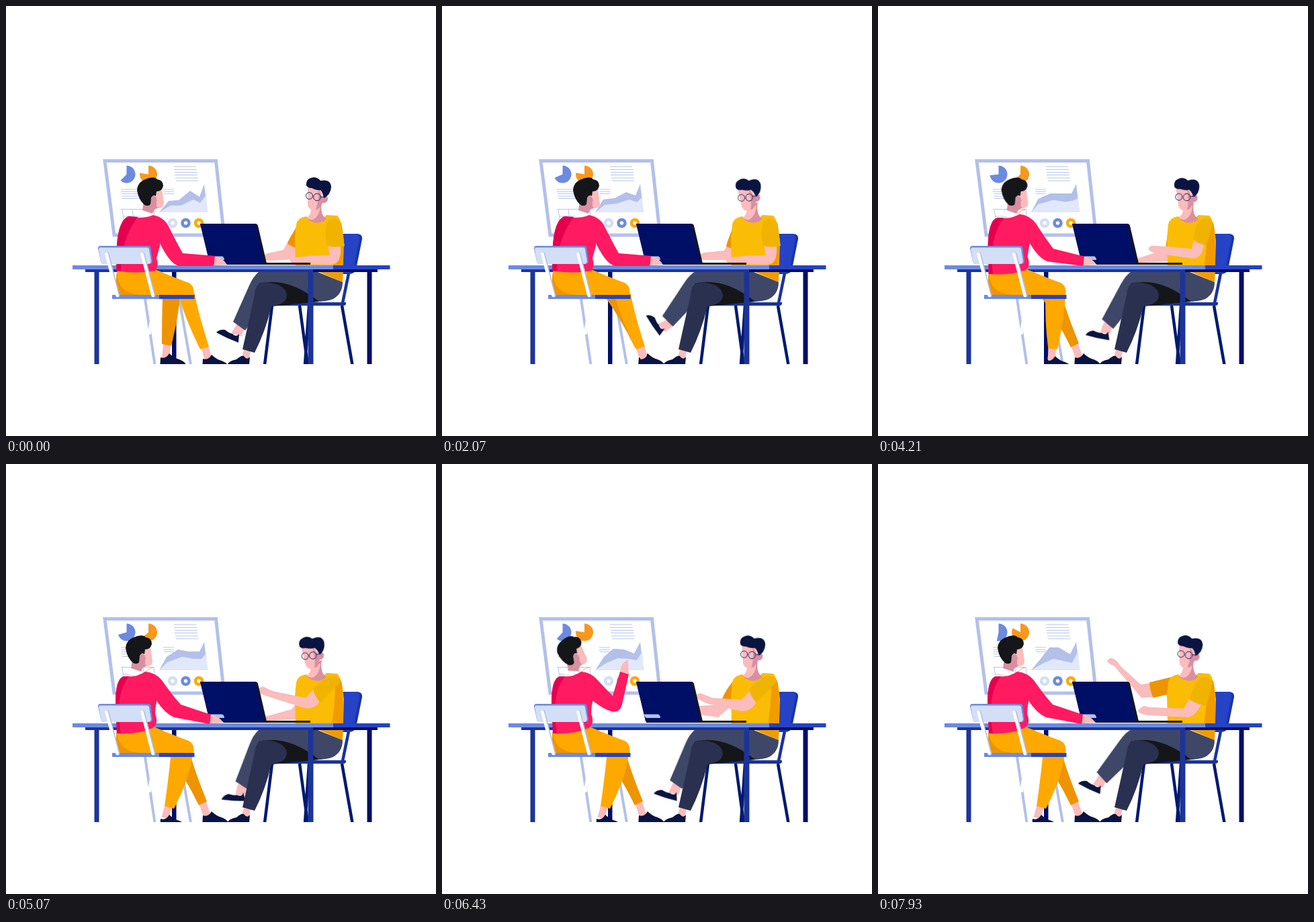
Recreate the animation shown at these times as an HTML page without scripts. Size 640 px wide and 640 px high, loop 8000 ms.

```html
<!DOCTYPE html>
<html lang="en">
<head>
<meta charset="utf-8">
<title>Office meeting</title>
<style>
html, body { margin: 0; width: 100%; height: 100%; overflow: hidden; background: #fff; }
svg { display: block; width: 100%; height: 100%; }
.a { animation: 8s ease-in-out infinite; }

/* board */
.pie { fill: none; stroke-width: 13; animation-timing-function: linear; }
.pie1 { animation-name: pie1; }
.pie2 { animation-name: pie2; }
@keyframes pie1 {
  0% { stroke-dasharray: 224 360; } 16.1% { stroke-dasharray: 235 360; } 25.9% { stroke-dasharray: 245 360; }
  43.8% { stroke-dasharray: 270 360; } 63.4% { stroke-dasharray: 253 360; } 80.4% { stroke-dasharray: 222 360; }
  99.1%, 100% { stroke-dasharray: 193 360; }
}
@keyframes pie2 {
  0% { stroke-dasharray: 279 360; } 16.1% { stroke-dasharray: 270 360; } 25.9% { stroke-dasharray: 281 360; }
  43.8% { stroke-dasharray: 228 360; } 63.4% { stroke-dasharray: 230 360; } 80.4% { stroke-dasharray: 280 360; }
  99.1%, 100% { stroke-dasharray: 300 360; }
}
.area1 { animation-name: area1; }
.area2 { animation-name: area2; }
@keyframes area1 {
  0% { d: path("M228 307L242 290L257 289L274 275L288 284L295 265L300 307Z"); }
  16.1%, 25.9% { d: path("M228 307L240 288L257 286L274 277L288 282L295 265L300 307Z"); }
  43.8% { d: path("M228 307L238 287L257 281L275 279L288 279L295 265L300 307Z"); }
  63.4% { d: path("M228 307L239 287L256 276L272 279L288 279L295 265L300 307Z"); }
  80.4% { d: path("M228 307L241 287L255 275L271 276L286 282L295 265L300 307Z"); }
  99.1%, 100% { d: path("M228 307L242 290L255 273L269 273L286 283L295 265L300 307Z"); }
}
@keyframes area2 {
  0% { d: path("M228 307L245 297L260 297L279 288L289 293L298 281L300 307Z"); }
  16.1%, 25.9% { d: path("M228 307L242 296L260 294L279 288L290 292L298 285L300 307Z"); }
  43.8% { d: path("M228 307L237 295L261 290L279 293L291 289L298 289L300 307Z"); }
  63.4% { d: path("M228 307L240 295L262 287L279 290L291 290L298 282L300 307Z"); }
  80.4% { d: path("M228 307L243 297L262 289L277 290L290 292L298 279L300 307Z"); }
  99.1%, 100% { d: path("M228 307L245 297L261 290L271 292L289 296L298 278L300 307Z"); }
}

/* left person */
.lean { animation-name: lean; }
.nod { animation-name: nod; transform-origin: 217px 300px; }
.torso { animation-name: torso; }
.shade { animation-name: shade; }
.arm { animation-name: arm; }
.hand { animation-name: hand; }
@keyframes lean { 0%, 46% { transform: none; } 57%, 100% { transform: translateX(-17px); } }
@keyframes nod { 0%, 66% { transform: none; } 76%, 84% { transform: rotate(-16deg); } 94%, 100% { transform: none; } }
@keyframes torso {
  0%, 46% { d: path("M182 313Q168 318 165 355L164 394Q195 399 222 394Q228 388 224 375Q230 355 231 345Q245 320 218 311Q205 318 182 313Z"); }
  57%, 100% { d: path("M176 316Q163 318 163 355L165 401Q195 403 218 393Q228 386 222 372Q222 360 226 345Q235 322 207 309Q195 318 176 316Z"); }
}
@keyframes shade {
  0%, 46% { d: path("M183 313Q168 318 165 355L164 394L171 395Q170 350 196 314Z"); }
  57%, 100% { d: path("M176 316Q163 318 163 355L165 401L171 401Q161 345 183 316Z"); }
}
@keyframes arm {
  0%, 46% { d: path("M218 311Q236 314 243 330Q254 352 263 368L311 372L309 387L258 387Q245 385 230 355Z"); }
  57%, 66%, 94%, 100% { d: path("M207 309Q222 310 232 322Q246 342 260 358L305 373L303 387L250 377Q236 371 224 352Z"); }
  76%, 84% { d: path("M207 309Q222 310 232 322Q243 334 254 345L265 309L278 313L268 358Q262 382 224 352Z"); }
}
@keyframes hand {
  0%, 46% { d: path("M311 373Q321 373 329 385L309 386Z"); }
  57%, 66%, 94%, 100% { d: path("M305 373Q315 374 324 385L303 386Z"); }
  76%, 84% { d: path("M265 309Q266 296 277 291L278 313Z"); }
}
.ankle { fill: none; stroke: #fabcbc; stroke-width: 11; }
.far .shin { animation-name: farShin; }
.far .ankle { animation-name: farAnkle; }
.far .shoe { animation-name: farShoe; }
.near .shin { animation-name: nearShin; }
.near .ankle { animation-name: nearAnkle; }
.near .shoe { animation-name: nearShoe; }
@keyframes farShin {
  0%, 17% { d: path("M233 432L259 432Q257 460 246 506L232 503Q232 470 233 432Z"); }
  25%, 100% { d: path("M242 432L274 432Q282 460 299 502L287 508Q266 465 242 432Z"); }
}
@keyframes farAnkle { 0%, 17% { d: path("M240 502L237 526"); } 25%, 100% { d: path("M292 502L300 526"); } }
@keyframes farShoe { 0%, 17% { transform: none; } 25%, 100% { transform: translateX(63px); } }
@keyframes nearShin {
  0%, 46% { d: path("M257 428L281 428Q284 450 302 507L289 511Q262 455 257 428Z"); }
  57%, 100% { d: path("M246 428L278 428Q276 462 250 513L236 509Q241 475 246 428Z"); }
}
@keyframes nearAnkle { 0%, 46% { d: path("M296 507L301 526"); } 57%, 100% { d: path("M242 508L237 527"); } }
@keyframes nearShoe { 0%, 46% { transform: translate(63px, 2px); } 57%, 100% { transform: translate(0, 5px); } }

/* right person */
.head { animation-name: head; transform-origin: 462px 310px; }
@keyframes head {
  0% { transform: none; } 16.1%, 25.9% { transform: rotate(-13deg); } 43.8% { transform: rotate(-3.5deg); }
  63.4% { transform: rotate(-14deg); } 80.4% { transform: rotate(-4deg); } 99.1%, 100% { transform: rotate(-1deg); }
}
.swing { animation-name: swing; transform-origin: 385px 405px; }
.foot { animation-name: foot; transform-origin: 346px 482px; }
@keyframes swing {
  0% { transform: none; } 16.1%, 43.8% { transform: rotate(9.5deg); } 63.4% { transform: rotate(-3deg); }
  80.4% { transform: rotate(-1deg); } 99.1%, 100% { transform: rotate(12deg); }
}
@keyframes foot {
  0% { transform: none; } 16.1% { transform: rotate(-6.5deg); } 25.9% { transform: rotate(22deg); }
  43.8% { transform: rotate(-15.5deg); } 63.4% { transform: rotate(-18deg); } 80.4% { transform: rotate(-6deg); }
  99.1%, 100% { transform: rotate(-11deg); }
}
.backSleeve { animation-name: backSleeve; }
.backArm { animation-name: backArm; }
.sleeve { animation-name: sleeve; }
.frontArm { animation-name: frontArm; }
@keyframes backSleeve {
  0% { d: path("M434 326L434 362L419 354Q420 349 425 341Z"); }
  16.1% { d: path("M439 317L433 346L417 353Q408 347 407 334Z"); }
  25.9% { d: path("M434 326L434 362L423 358Q424 352 427 345Z"); }
  43.8% { d: path("M434 326L434 362L427 358Q427 352 429 345Z"); }
  63.4% { d: path("M436 326L436 362L431 358Q431 352 432 345Z"); }
  80.4% { d: path("M434 322L434 355L417 349Q420 342 425 334Z"); }
  99.1%, 100% { d: path("M441 316L431 343L410 348Q405 340 404 325Z"); }
}
@keyframes backArm {
  0% { d: path("M390 368L413 363L421 348L434 358L432 377L390 379Q384 378 382 374Q384 370 390 368Z"); }
  16.1% { d: path("M357 322L397 339L408 333L417 352L397 358L345 326Q334 323 334 318Q342 309 357 322Z"); }
  25.9% { d: path("M390 367L420 364L427 352L434 358L432 378L390 378Q384 378 382 374Q384 369 390 367Z"); }
  43.8% { d: path("M390 374L422 363L428 356L434 358L432 380L390 382Q384 381 382 378Q384 376 390 374Z"); }
  63.4% { d: path("M390 375L425 365L431 358L434 358L432 380L390 382Q384 381 382 378Q384 376 390 375Z"); }
  80.4% { d: path("M384 360L415 358L424 348L434 357L411 377L384 373Q376 370 374 366Q376 361 384 360Z"); }
  99.1%, 100% { d: path("M362 302L391 328L406 326L410 347L392 348L352 301Q342 297 341 293Q349 282 362 302Z"); }
}
@keyframes sleeve {
  0%, 25.9%, 43.8% { d: path("M478 320Q488 312 498 322L504 357Q490 360 478 357Q473 338 478 320Z"); }
  16.1% { d: path("M478 320Q488 312 498 322L511 351Q500 358 487 357Q474 345 478 320Z"); }
  63.4%, 80.4% { d: path("M480 317Q492 312 499 323L468 355Q460 348 457 335Q466 325 480 317Z"); }
  99.1%, 100% { d: path("M478 320Q490 312 498 325L489 360Q475 358 463 350Q470 330 478 320Z"); }
}
@keyframes frontArm {
  0%, 25.9%, 43.8% { d: path("M425 375L450 372L482 371L479 355L498 355Q500 385 484 385L430 384Q418 380 425 375Z"); }
  16.1% { d: path("M436 363L450 367L493 368L486 355L509 351Q520 383 503 383L440 376Q424 370 436 363Z"); }
  63.4% { d: path("M382 331L397 338L446 348L458 335L467 353Q458 368 440 362L390 346Q364 338 382 331Z"); }
  80.4% { d: path("M385 341L402 348L446 351L458 338L469 352Q462 368 446 368L396 357Q366 345 385 341Z"); }
  99.1%, 100% { d: path("M396 360L405 362L455 364L465 347L482 357Q470 378 460 377L402 374Q376 370 396 360Z"); }
}
</style>
</head>
<body>
<svg viewBox="0 0 640 640">
  <defs>
    <clipPath id="floor"><path d="M0 0H640V533H0Z"/></clipPath>
    <path id="shoe" d="M229 540L230 523Q238 526 243 517Q250 524 258 526Q266 529 268 534V540Z" fill="#0a1440"/>
  </defs>
  <g clip-path="url(#floor)">

    <!-- board -->
    <path d="M147 230.500H312.500L324.500 341H161Z" fill="#fff" stroke="#b3c0ea" stroke-width="5"/>
    <circle class="a pie pie1" cx="179.500" cy="250.500" r="6.500" pathLength="360" stroke="#6c8ae0" stroke-dasharray="224 360" transform="rotate(-90 179.500 250.500)"/>
    <circle class="a pie pie2" cx="212" cy="250.500" r="6.500" pathLength="360" stroke="#f8981d" stroke-dasharray="279 360" transform="rotate(-90 212 250.500)"/>
    <g fill="none" stroke="#b9c5ea">
      <path d="M250 239H283M250 243.500H284M251 247.500H285M251 251.500H285M252 256H286M253 260H286"/>
      <path d="M171 273H196M171 276.500H196M172 279.500H197M172 283H197M173 286.500H198M234 273H250M234 276.500H250M235 279.500H250"/>
      <path d="M171 302.500H221M173 302L177 334M188 302L191 328M204 302L206 320M220 302L221 312M174 313H215"/>
      <path d="M206 313Q210 304 219 303" stroke="#f0a860"/>
    </g>
    <path class="a area1" fill="#b3c0ea"/>
    <path class="a area2" fill="#e0e8fa"/>
    <g fill="none" stroke-width="4.500">
      <circle cx="248" cy="323" r="5" stroke="#d3def7"/>
      <circle cx="267.500" cy="323" r="5" stroke="#6c8ae0"/>
      <circle cx="287" cy="323" r="5" stroke="#ffa800"/>
    </g>

    <!-- right chair -->
    <path d="M500 339H523Q531 340 530 347L521 392Q519 399 510 399H500Z" fill="#1a35a8"/>
    <path d="M500 339H520Q527 340 526 347L517 391Q515 397 508 397H500Z" fill="#2543c4"/>
    <g fill="none" stroke="#001a6e" stroke-width="4.500">
      <path d="M396 446L385 534M437 446L449 534M451 446L445 534M500 446L515.500 534"/>
      <path d="M510 398L501 442" stroke="#1c3499"/>
    </g>
    <path d="M394 443Q396 441 400 441H506V444Q505 446 502 446H394Z" fill="#1c3499"/>

    <!-- right person -->
    <path class="a backArm" fill="#fabcbc"/>
    <path class="a backSleeve" fill="#ee9400"/>
    <path d="M447 313Q434 315 432 325L430 345L431 386L462 394L501 411L503 350Q500 318 493 312L477 311Q462 328 447 313Z" fill="#fbbc05"/>
    <path d="M499 322Q504 345 501 411L462 394H484Q490 360 490 328Z" fill="#f09c00"/>
    <g>
      <path d="M455 298L470 292Q467 311 477 317Q463 329 447 316Q455 312 455 298Z" fill="#d98fa0"/>
      <path d="M454 300L468 297Q467 313 457 318Q452 319 447 315Q455 311 454 300Z" fill="#fabcbc"/>
    </g>
    <g class="a head">
      <path d="M449 270H469L471 285Q476 279 479 286Q479 293 472 293L469 296Q467 303 460 304Q449 304 449 293Z" fill="#fabcbc"/>
      <path d="M465 272L470 284Q477 279 479 286Q479 294 471 293L468 299Q464 304 461 303Q466 290 465 272Z" fill="#d98fa0"/>
      <path d="M447 267Q446 256 458 255Q464 255 468 260Q484 257 484 270Q483 281 473 286Q471 276 468 274Q464 275 455 271Q449 271 447 267Z" fill="#0a1440"/>
      <g fill="none" stroke="#1a2470">
        <circle cx="451.500" cy="282.500" r="5"/><circle cx="463" cy="284.500" r="5.300"/><path d="M468 284L476 284.500"/>
      </g>
    </g>
    <path class="a frontArm" fill="#fabcbc"/>
    <path class="a sleeve" fill="#f0b400"/>
    <g class="a swing">
      <g class="a foot">
        <path d="M344 473L355 480L350 492L335 487Z" fill="#fabcbc"/>
        <path d="M313 486Q318 481 326 482Q332 487 337 488Q343 494 347 488L346 501L329 494Z" fill="#0a1440"/>
      </g>
      <path d="M392 394H378Q368 402 362 416L338 470L356 483L392 430Z" fill="#3f4768"/>
    </g>
    <path d="M377 396H464L501 411Q501 428 487 436Q477 441 450 440L376 425Z" fill="#3f4768"/>
    <path d="M376 413Q420 403 466 440L396 447Z" fill="#141619"/>
    <path d="M354 512L364 514L361 528H349Z" fill="#fabcbc"/>
    <path d="M329 534Q332 528 343 526Q350 520 354 521Q359 528 363 522L362 534Z" fill="#0a1440"/>
    <path d="M383 411Q371 413 370 430L352 511L370 516Q386 485 395 447Q418 444 418 430Q415 412 383 411Z" fill="#2a3050"/>

    <!-- laptop and table -->
    <path d="M289 324H371Q374 324 375 327L388 383V385H304Z" fill="#14161c"/>
    <path d="M289 324H369Q371 324 372 327L385 383H303Z" fill="#000f66"/>
    <path d="M386 382H453V385H386Z" fill="#14161c"/>
    <path d="M301 372.500H322Q325 374 325 378H304Q301 376 301 372.500Z" fill="#b3c0ea"/>
    <path d="M247 395H253.500V534H247ZM537.500 395H544.500V534H537.500Z" fill="#000f66"/>
    <path d="M131.500 395H138.500V534H131.500ZM449.500 395H457.500V534H449.500ZM118 392H553V396H118Z" fill="#1c3499"/>
    <path d="M457 392H553V396H457Z" fill="#000f66"/>
    <path d="M99 386H487V392H99Z" fill="#6c8ae4"/>
    <path d="M487 386H571.500V392H487Z" fill="#2543c4"/>

    <!-- left person -->
    <path d="M207 436L221.500 534M258 436L275 534" stroke="#b3c0ea" stroke-width="4"/>
    <path d="M215 463L216 488L210 490Z" fill="#fff"/>
    <g class="far">
      <path class="a ankle"/>
      <use class="a shoe" href="#shoe"/>
      <path class="a shin" fill="#ee9400"/>
    </g>
    <g class="near">
      <path class="a ankle"/>
      <use class="a shoe" href="#shoe"/>
      <path class="a shin" fill="#ffa800"/>
    </g>
    <path d="M166 392Q162 408 165 422Q168 432 176 432H279Q282 417 272 412Q250 404 222 392Z" fill="#ffa800"/>
    <path d="M165 396Q166 428 200 430L216 432H176Q166 431 165 420Q163 408 165 396Z" fill="#ee9400"/>
    <path class="a torso" fill="#ff1a61"/>
    <path class="a shade" fill="#e5004f"/>
    <path class="a hand" fill="#fabcbc"/>
    <path class="a arm" fill="#ff1a61"/>
    <g class="a lean">
      <path d="M194 311L204 303L220 303L219 311Q208 317 194 311Z" fill="#fff"/>
      <path d="M219 303L220 310" stroke="#d3def7"/>
      <g class="a nod">
        <path d="M205 290L224 284L230 300Q219 301 218 309L203 304Z" fill="#d98fa0"/>
        <path d="M222 274L232 272L235 293Q235 301 227 301Q223 300 224 290Z" fill="#fabcbc"/>
        <path d="M195 274Q196 260 213 256Q222 254 225 258Q234 259 234 268Q232 276 224 276L223 283Q219 280 216 286L215 295Q212 299 206 296Q197 288 195 274Z" fill="#14161a"/>
        <path d="M216 287Q219 280 223 284L225 290Q220 295 216 294Z" fill="#d98fa0"/>
      </g>
    </g>

    <!-- left chair -->
    <path d="M140 357H212Q215 357 215.500 360L218 380Q218 384 214 384H146Q142 384 141 380L137 361Q137 357 140 357Z" fill="#6c8ae0"/>
    <path d="M139 359.500H210Q213 360 213 362L216 380Q215 384 212 384H146Q142 384 141 380L138 362Z" fill="#d3def7"/>
    <path d="M158 430H228V436H158Z" fill="#6c8ae4"/>
    <path d="M228 430H280.500V436H228Z" fill="#2543c4"/>
    <g fill="none" stroke-linecap="round">
      <path d="M151 369L167 431M204 369L220 431" stroke="#b3c0ea" stroke-width="5"/>
      <path d="M149.500 369L165.500 431M202.500 369L218.500 431" stroke="#fff" stroke-width="4.500"/>
    </g>
  </g>
</svg>
</body>
</html>
```
